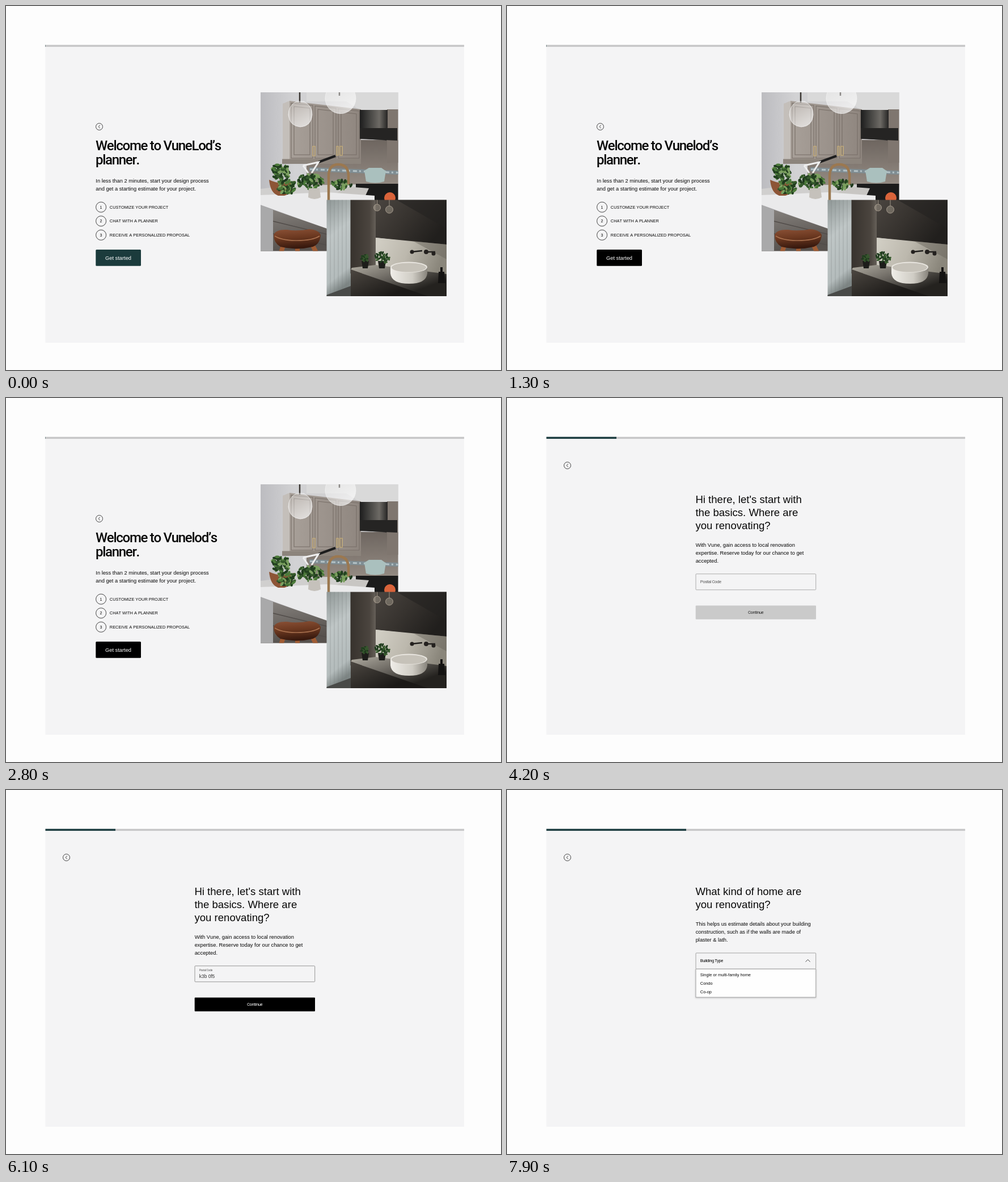
These frames come from a looping animation (873x641 px, 8000 ms). An HTML page:

```html
<!DOCTYPE html>
<html lang="en">
<head>
<meta charset="utf-8">
<title>Renovation planner</title>
<style>
  html, body { margin: 0; width: 100%; height: 100%; overflow: hidden; background: #fdfdfd; }
  svg { display: block; width: 873px; height: 641px; }
  text { font-family: "Liberation Sans", Arial, sans-serif; font-kerning: none; fill: #080808; }
  .title { font: 500 24px Roboto, sans-serif; letter-spacing: -.054em; font-kerning: none; }
  .ask { font-size: 18.6px; }
  .body { font-size: 9.3px; }
  .step { font-size: 7.4px; }
  .num { font-size: 7.2px; text-anchor: middle; }
  .tight { font: 7.7px Roboto, sans-serif; letter-spacing: -.055em; }
  .mid { text-anchor: middle; }
  .line { fill: none; stroke: #303030; stroke-width: .9; }
  .field { fill: none; stroke: #a2a2a2; stroke-width: 1; }
  #menu { filter: drop-shadow(0 1px 1.5px #0003); }
</style>
</head>
<body>
<svg viewBox="0 0 873 641">
  <defs>
    <clipPath id="kitchenClip"><rect x="449" y="152" width="242.5" height="279.5"/></clipPath>
    <clipPath id="bathClip"><rect x="565.5" y="341.5" width="211.5" height="169.5"/></clipPath>
    <clipPath id="menuClip"><rect id="menuArea" x="325" y="315" width="230" height="0"/></clipPath>
    <linearGradient id="wall"><stop offset="0" stop-color="#bcbcc0"/><stop offset=".25" stop-color="#d2d2d4"/><stop offset="1" stop-color="#cbcaca"/></linearGradient>
    <linearGradient id="cabinet"><stop offset="0" stop-color="#a8a099"/><stop offset="1" stop-color="#8f867f"/></linearGradient>
    <linearGradient id="hood"><stop offset="0" stop-color="#1d1d1d"/><stop offset=".4" stop-color="#4a4946"/><stop offset=".7" stop-color="#6d6a65"/><stop offset="1" stop-color="#262524"/></linearGradient>
    <linearGradient id="tiles" x2="0" y2="1"><stop offset="0" stop-color="#6e6660"/><stop offset="1" stop-color="#958c84"/></linearGradient>
    <linearGradient id="island" x2=".3" y2="1"><stop offset="0" stop-color="#8b8783"/><stop offset="1" stop-color="#57524e"/></linearGradient>
    <linearGradient id="seat" x2=".2" y2="1"><stop offset="0" stop-color="#8b5136"/><stop offset=".5" stop-color="#6b3820"/><stop offset="1" stop-color="#38190e"/></linearGradient>
    <linearGradient id="glass" x2=".6" y2="1"><stop offset="0" stop-color="#fff" stop-opacity=".2"/><stop offset="1" stop-color="#fff" stop-opacity=".65"/></linearGradient>
    <linearGradient id="blind" x2=".2" y2="1"><stop offset="0" stop-color="#8f9796"/><stop offset=".4" stop-color="#bfc6c6"/><stop offset=".85" stop-color="#b4bcbc"/><stop offset="1" stop-color="#7d8584"/></linearGradient>
    <linearGradient id="pillar"><stop offset="0" stop-color="#37322d"/><stop offset=".75" stop-color="#4b453f"/><stop offset="1" stop-color="#67615a"/></linearGradient>
    <linearGradient id="upper" x2="1" y2=".5"><stop offset="0" stop-color="#4a4540"/><stop offset=".5" stop-color="#37332f"/><stop offset="1" stop-color="#211f1d"/></linearGradient>
    <linearGradient id="splash" x2="1" y2=".25"><stop offset="0" stop-color="#d3d0c6"/><stop offset=".5" stop-color="#bcb8ad"/><stop offset="1" stop-color="#8a867b"/></linearGradient>
    <linearGradient id="counter" x2=".8" y2=".7"><stop offset="0" stop-color="#b0aca1"/><stop offset=".45" stop-color="#75716a"/><stop offset="1" stop-color="#24221f"/></linearGradient>
    <linearGradient id="front" x2=".8" y2=".6"><stop offset="0" stop-color="#4c4741"/><stop offset="1" stop-color="#1b1917"/></linearGradient>
    <linearGradient id="basin"><stop offset="0" stop-color="#efede8"/><stop offset=".6" stop-color="#cfccc4"/><stop offset="1" stop-color="#88847c"/></linearGradient>
    <g id="back"><circle r="6" class="line"/><path d="M1.4-2.8-1.5 0l2.9 2.8" class="line"/></g>
  </defs>

  <rect width="873" height="641" fill="#fdfdfd"/>
  <rect x="69.5" y="69" width="738.5" height="524" fill="#f4f4f5"/>
  <rect x="69.5" y="68.5" width="738.5" height="3.3" fill="#c5c5c6"/>
  <rect id="bar" x="69.5" y="68.5" height="3.3" fill="#17393c"/>

  <g id="welcome">
    <use href="#back" x="164.5" y="212.5"/>
    <text class="title" x="158" y="254.3" id="greeting"></text>
    <text class="title" x="158" y="279.3">planner.</text>
    <text class="body" x="158.3" y="311">In less than 2 minutes, start your design process</text>
    <text class="body" x="158.3" y="325">and get a starting estimate for your project.</text>
    <g id="steps"></g>
    <rect id="start" x="158.3" y="429" width="79.7" height="28.8" rx="1.5"/>
    <text class="body mid" x="198" y="446.7" style="fill:#fff">Get started</text>

    <g clip-path="url(#kitchenClip)">
      <rect x="449" y="152" width="243" height="280" fill="url(#wall)"/>
      <path d="M530 152H692V184H626L600 168H530Z" fill="#d9d9d9"/>
      <path d="M488 172 500 167V278H488Z" fill="#c4bfba"/>
      <path d="M500 167 626 182V278H500Z" fill="url(#cabinet)"/>
      <path d="M487 269.5H626V278H487Z" fill="#8c847c"/>
      <path d="M530 278H626V236H692V318H530Z" fill="url(#tiles)"/>
      <path d="M535 284 692 290V297L535 291Z" fill="#7f8d93"/>
      <path d="M536 287.5 692 293.5" stroke="#b3c1c5" stroke-width="3" stroke-dasharray="7 4 3 5"/>
      <path d="M672 182H692V276H672Z" fill="#7f766f"/>
      <path d="M624 183H673V213L671 237 624 233Z" fill="url(#hood)"/>
      <path d="M624 215H690V237L624 234Z" fill="#252423"/>
      <path d="M503 171 541 175V268H503ZM508 177 536 180V262H508ZM545 176 582 180V268H545ZM550 182 577 185V262H550ZM586 181 623 185V268H586ZM591 187 618 190V262H591Z" fill="none" stroke="#786f68" stroke-width="1.1"/>
      <path d="M541 247v17h4v-17zM583 247v16h3v-16zM589 247v16h4v-16z" fill="none" stroke="#d1b578" stroke-width="1.2"/>
      <path d="M449 322 500 316 692 313V345H449Z" fill="#d0cfce"/>
      <path d="M617 313H692V342H617Z" fill="#1b1b1b"/>
      <path d="M600 318 640 321 632 338H572Z" fill="#c8c6c3"/>
      <path d="M449 333 566 328 650 334V345H566V392L449 350Z" fill="#eaeaeb"/>
      <path d="M449 351 566 392V432H449Z" fill="url(#island)"/>
      <path d="M449 351 471 359V432H449Z" fill="#a9a9aa"/>
      <path d="M471 379 566 402M471 401 566 421" stroke="#514c49" stroke-width="1.5"/>
      <path d="M632 290h38l-3 19q-16 5-32 0zM640 285h22l7 5h-37z" fill="#aac0be"/>
      <path d="M464 306q20 10 45 2-3 22-18 26h-11q-14-5-16-28z" fill="#8d5536"/>
      <g id="leaves"></g>
      <path d="M534 321h19l2 16q-11 6-22 0z" fill="#c5c1bb"/>
      <path d="M569 342V300Q569 279 586 279 604 279 604 300V314" fill="none" stroke="#9b7850" stroke-width="4.5"/>
      <path d="M551 275 581 264" stroke="#1d1d1d" stroke-width="4.5"/>
      <path d="M524 281 551 275 539 294M524 281 533 294" fill="none" stroke="#eee" stroke-width="3"/>
      <circle cx="677" cy="338" r="10" fill="#d9633a"/>
      <path d="M489 422 485 434M514 424V434M541 422 547 434" stroke="#a05c34" stroke-width="8"/>
      <path d="M472 403Q476 393 496 394 514 397 535 393 551 394 555 403 554 419 541 424 513 431 484 424 472 417 472 403Z" fill="url(#seat)"/>
      <path d="M474 405Q486 413 513 413 541 413 553 405" fill="none" stroke="#a9714f" stroke-width="1.6"/>
      <path d="M518 152V170M588 152V158" stroke="#3b3733" stroke-width="2.5"/>
      <g fill="url(#glass)" stroke="#f4f4f4" stroke-opacity=".7">
        <path d="M512 168h13q16 8 15 24-2 20-21 21-19-2-21-21 0-16 14-24z"/>
        <circle cx="590" cy="162.5" r="27"/>
      </g>
    </g>

    <g clip-path="url(#bathClip)">
      <rect x="565" y="341" width="43" height="170" fill="url(#blind)"/>
      <path d="M572 341V511M579 341V508M586 341V505M593 341V502M600 341V499" stroke="#78817f" stroke-opacity=".4"/>
      <path d="M565 509 608 493V511H565Z" fill="#494a48"/>
      <rect x="607.5" y="341" width="45" height="130" fill="url(#pillar)"/>
      <path d="M652 341H777V422L652 408Z" fill="url(#upper)"/>
      <path d="M688 341H777V392Z" fill="#242220" fill-opacity=".6"/>
      <path d="M652 408 777 420V482L652 464Z" fill="url(#splash)"/>
      <path d="M718 414 777 420V446Z" fill="#67635a" fill-opacity=".45"/>
      <path d="M610 461 652 456 777 472V511H740L608 464Z" fill="url(#counter)"/>
      <path d="M608 464 744 511H608Z" fill="url(#front)"/>
      <path d="M678 460V471Q680 489 711 489 741 489 743 471V460Z" fill="url(#basin)"/>
      <ellipse cx="710.5" cy="460" rx="32.5" ry="9.5" fill="#e9e6e0"/>
      <ellipse cx="710.5" cy="460.5" rx="30.5" ry="8" fill="#c6c2b9"/>
      <path d="M715 433 734 431M739 433H757" stroke="#211f1d" stroke-width="2.5"/>
      <g fill="#24211f"><circle cx="716" cy="433" r="3.5"/><circle cx="741" cy="433" r="4"/><circle cx="754" cy="436" r="3.5"/></g>
      <path d="M627 449h13l-2 13h-9zM656 449h14l-2 13h-10z" fill="#1d1d1a"/>
      <g id="sprigs"></g>
      <path d="M763 468h10l2 20h-13zM766 460h4v8h-4z" fill="#141312"/>
      <g fill="#d9cfbd" fill-opacity=".3" stroke="#b5aa9b" stroke-width=".8"><circle cx="654.5" cy="355" r="6"/><circle cx="676" cy="358.5" r="6.5"/><path d="M654.5 341v8M676 341v11"/></g>
    </g>
  </g>

  <g id="postal">
    <use href="#back" x="106.5" y="118.8"/>
    <g id="postalCopy"></g>
    <rect class="field" id="field" x="333" y="309.8" width="211.7" height="28" rx="1"/>
    <text class="tight" id="label" style="fill:#555">Postal Code</text>
    <text id="typed" x="340.8" y="331" font-size="8.4" style="fill:#333"></text>
    <rect id="next" x="332.7" y="365.4" width="212.3" height="24.4" rx="1"/>
    <text class="tight mid" id="nextText" x="438.6" y="380.2">Continue</text>
  </g>

  <g id="home">
    <use href="#back" x="106.5" y="118.8"/>
    <g id="homeCopy"></g>
    <g clip-path="url(#menuClip)">
      <g id="menu">
        <rect x="333" y="315" width="211.7" height="50" fill="#fefefe" stroke="#a2a2a2"/>
        <g id="options"></g>
      </g>
    </g>
    <rect class="field" x="333" y="287" width="211.7" height="28" rx="1"/>
    <text class="tight" x="340.8" y="302.9">Building Type</text>
    <path class="line" id="chevron" d="M-4 2 0-2 4 2"/>
  </g>
</svg>
<script>
const $ = id => document.getElementById(id);
const text = (cls, x, y, s) => `<text class="${cls}" x="${x}" y="${y}">${s}</text>`;
const lines = (cls, x, y, gap, list) => list.map((s, i) => text(cls, x, y + i * gap, s)).join("");

$("steps").innerHTML = ["CUSTOMIZE YOUR PROJECT", "CHAT WITH A PLANNER", "RECEIVE A PERSONALIZED PROPOSAL"]
  .map((s, i) => {
    const y = 354.2 + i * 24.55;
    return `<circle class="line" cx="167.6" cy="${y}" r="9"/>` +
      text("num", 167.6, y + 2.6, i + 1) + text("step", 182.8, y + 2.7, s);
  }).join("");

$("postalCopy").innerHTML =
  lines("ask", 332.4, 184.7, 23.2, ["Hi there, let's start with", "the basics. Where are", "you renovating?"]) +
  lines("body", 332.7, 262, 13.9, ["With Vune, gain access to local renovation",
    "expertise. Reserve today for our chance to get", "accepted."]);

$("homeCopy").innerHTML =
  lines("ask", 332.4, 184.7, 23.2, ["What kind of home are", "you renovating?"]) +
  lines("body", 332.7, 238.9, 13.9, ["This helps us estimate details about your building",
    "construction, such as if the walls are made of", "plaster &amp; lath."]);

$("options").innerHTML = lines("step", 340.8, 328, 14.9, ["Single or multi-family home", "Condo", "Co-op"]);

let seed = 7;
const rand = () => (seed = seed * 16807 % 2147483647) / 2147483647;
const greens = ["#1f3a1e", "#35592c", "#4c7a3a", "#22401f", "#7ba05f"];

// A bush of randomly turned leaves
function bush(cx, cy, rx, ry, n, size, shades = 5) {
  let out = "";
  for (let i = 0; i < n; i++) {
    const a = rand() * 6.283, d = Math.sqrt(rand());
    const x = cx + Math.cos(a) * d * rx, y = cy + Math.sin(a) * d * ry;
    out += `<ellipse rx="${size}" ry="${size * .5}" fill="${greens[i % shades]}"
      transform="translate(${x} ${y}) rotate(${rand() * 180})"/>`;
  }
  return out;
}
$("leaves").innerHTML = bush(484, 292, 15, 14, 50, 4.5) + bush(495, 318, 16, 12, 48, 4.5) +
  bush(536, 309, 22, 13, 60, 4.5) + bush(592, 315, 18, 8, 36, 4);
$("sprigs").innerHTML = bush(633, 444, 7, 6, 18, 2.8, 2) + bush(663, 443, 13, 10, 30, 3.2, 2);

const ramp = (t, a, b) => Math.min(1, Math.max(0, (t - a) / (b - a)));
const mix = (a, b, k) => a + (b - a) * k;
const gray = v => `rgb(${v},${v},${v})`;
const show = (id, on) => $(id).style.display = on ? "" : "none";

const LOOP = 8000, TICK = 100;
const RESTYLE = 1000, POSTAL = 2900, HOME = 6200;

function draw(t) {
  show("welcome", t < POSTAL);
  show("postal", t >= POSTAL && t < HOME);
  show("home", t >= HOME);

  const late = t >= RESTYLE;
  $("greeting").textContent = `Welcome to ${late ? "Vunelod" : "VuneLod"}’s`;
  $("start").setAttribute("fill", late ? "#000" : "#1b3b3c");

  const bar = .5 + 123 * (ramp(t, POSTAL - TICK, POSTAL + 300) + ramp(t, HOME - TICK, HOME + 300));
  $("bar").setAttribute("width", bar);

  const float = ramp(t, 4200, 4400);
  $("label").setAttribute("transform",
    `translate(340.8 ${mix(326, 319.4, float)}) scale(${mix(1, .63, float)})`);
  $("field").style.stroke = gray(mix(172, 150, float));
  $("typed").textContent = "k3b 0f5".slice(0, Math.max(0, t / TICK - 52));

  const ready = ramp(t, 5800, 6000);
  $("next").setAttribute("fill", gray(mix(202, 0, ready)));
  $("nextText").style.fill = gray(mix(35, 255, ready));

  const open = ramp(t, 7600, 7900);
  $("menuArea").setAttribute("height", 56 * open);
  $("chevron").setAttribute("transform", `translate(530.6 300.6) scale(1 ${open ? 1 : -1})`);
}

const began = performance.now();
function frame() {
  const t = (performance.now() - began) % LOOP;
  draw(Math.floor(t / TICK) * TICK);
  requestAnimationFrame(frame);
}
frame();
</script>
</body>
</html>
```
